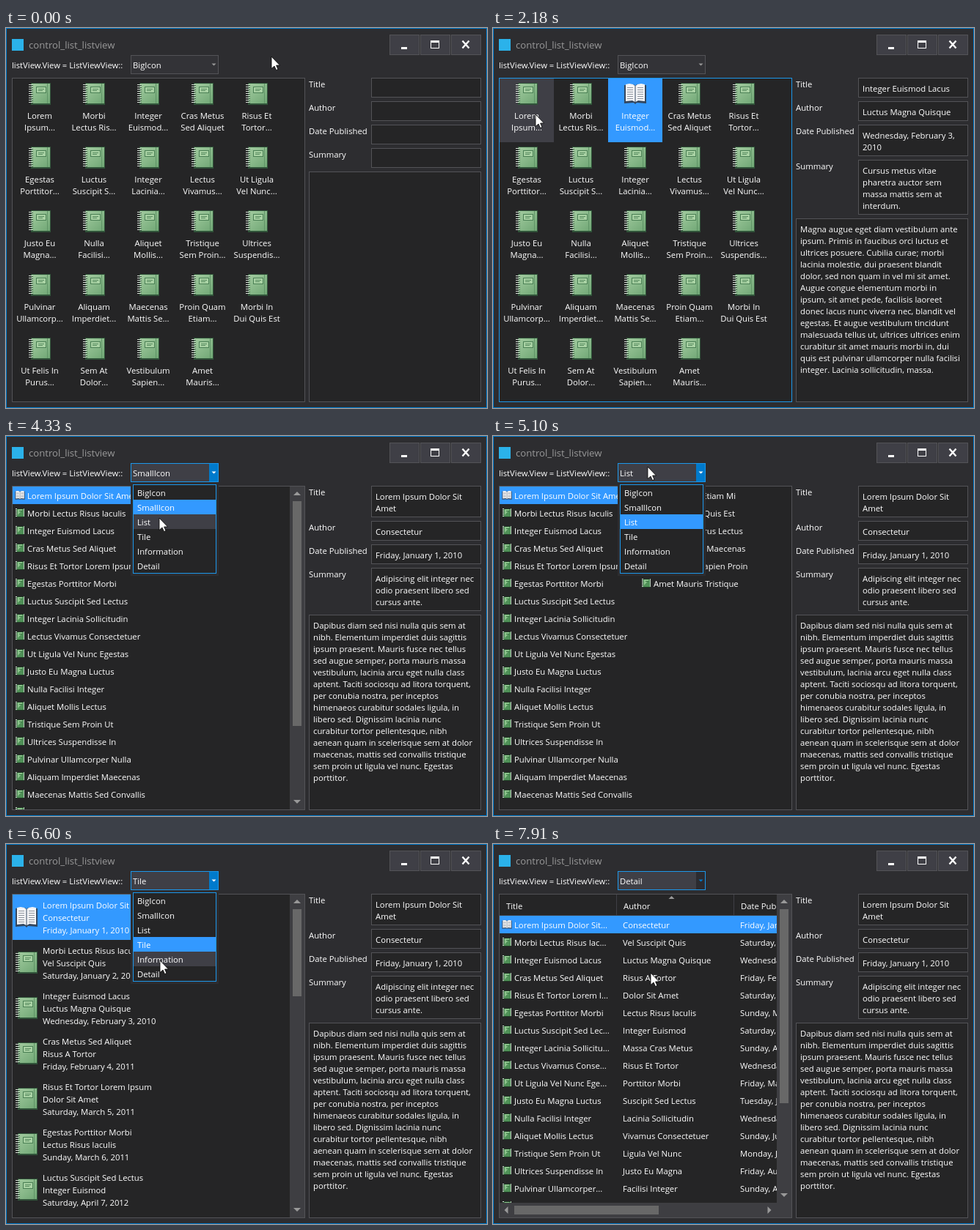
Recreate the animation shown at these times as an HTML page with a canvas. Size 656x519 px, loop 8 s.

```html
<!DOCTYPE html>
<html lang="en">
<head>
<meta charset="utf-8">
<title>control_list_listview</title>
<style>
html, body { margin: 0; width: 100%; height: 100%; overflow: hidden; background: #2d2d30; }
canvas { display: block; }
</style>
</head>
<body>
<canvas id="stage" width="656" height="519"></canvas>
<script>
const ctx = document.getElementById('stage').getContext('2d');
const LOOP = 8000;
const C = {
  bg: '#2d2d30', panel: '#252526', line: '#535357', hot: '#3f3f46', bar: '#3e3e42', thumb: '#686868',
  blue: '#007acc', focus: '#1c97ea', select: '#3399ff', text: '#ffffff', dim: '#999999'
};
const VIEWS = ['BigIcon', 'SmallIcon', 'List', 'Tile', 'Information', 'Detail'];
const BIG = 0, SMALL = 1, LIST = 2, TILE = 3, INFO = 4, DETAIL = 5;

// full title / two-line caption / author
const BOOKS = `Lorem Ipsum Dolor Sit Amet/Lorem|Ipsum.../Consectetur
Morbi Lectus Risus Iaculis/Morbi|Lectus Ris.../Vel Suscipit Quis
Integer Euismod Lacus/Integer|Euismod.../Luctus Magna Quisque
Cras Metus Sed Aliquet/Cras Metus|Sed Aliquet/Risus A Tortor
Risus Et Tortor Lorem Ipsum/Risus Et|Tortor.../Dolor Sit Amet
Egestas Porttitor Morbi/Egestas|Porttitor.../Lectus Risus Iaculis
Luctus Suscipit Sed Lectus/Luctus|Suscipit S.../Integer Euismod
Integer Lacinia Sollicitudin/Integer|Lacinia.../Massa Cras Metus
Lectus Vivamus Consectetuer/Lectus|Vivamus.../Risus Et Tortor
Ut Ligula Vel Nunc Egestas/Ut Ligula|Vel Nunc.../Porttitor Morbi
Justo Eu Magna Luctus/Justo Eu|Magna.../Suscipit Sed Lectus
Nulla Facilisi Integer/Nulla|Facilisi.../Lacinia Sollicitudin
Aliquet Mollis Lectus/Aliquet|Mollis.../Vivamus Consectetuer
Tristique Sem Proin Ut/Tristique|Sem Proin.../Ligula Vel Nunc
Ultrices Suspendisse In/Ultrices|Suspendis.../Justo Eu Magna
Pulvinar Ullamcorper Nulla/Pulvinar|Ullamcorp.../Facilisi Integer
Aliquam Imperdiet Maecenas/Aliquam|Imperdiet.../Aliquet Mollis
Maecenas Mattis Sed Convallis/Maecenas|Mattis Se.../Lectus Tristique
Proin Quam Etiam Mi/Proin Quam|Etiam.../Sem Proin
Morbi In Dui Quis Est/Morbi In|Dui Quis Est/Ultrices Suspendisse
Ut Felis In Purus Lectus/Ut Felis In|Purus.../Pulvinar Nulla
Sem At Dolor Maecenas/Sem At|Dolor.../Aliquam Imperdiet
Vestibulum Sapien Proin/Vestibulum|Sapien.../Mattis Sed
Amet Mauris Tristique/Amet|Mauris.../Convallis Proin`.split('\n').map((row, i) => {
  const [title, caption, author] = row.split('/');
  const day = new Date(2010 + Math.floor(i / 3), Math.floor(i / 2), i + 1);
  const date = day.toLocaleDateString('en-US', { weekday: 'long', month: 'long', day: 'numeric', year: 'numeric' });
  return { title, caption: caption.split('|'), author, date };
});

const DETAILS = [
  ['Lorem Ipsum Dolor Sit|Amet', 'Consectetur', 'Friday, January 1, 2010',
    'Adipiscing elit integer nec|odio praesent libero sed|cursus ante.',
    'Dapibus diam sed nisi nulla quis sem at|nibh. Elementum imperdiet duis sagittis|ipsum praesent. Mauris fusce nec tellus|sed augue semper, porta mauris massa|vestibulum, lacinia arcu eget nulla class|aptent. Taciti sociosqu ad litora torquent,|per conubia nostra, per inceptos|himenaeos curabitur sodales ligula, in|libero sed. Dignissim lacinia nunc|curabitur tortor pellentesque, nibh|aenean quam in scelerisque sem at dolor|maecenas, mattis sed convallis tristique|sem proin ut ligula vel nunc. Egestas|porttitor.'],
  ['Morbi Lectus Risus Iaculis', 'Vel Suscipit Quis', 'Saturday, January 2, 2010',
    'Luctus magna quisque|cursus metus vitae sed|aliquet risus.',
    'A tortor integer id quam morbi mi quisque|nisl felis. Venenatis tristique dignissim in|ultrices sit amet, augue proin sodales|libero eget ante. Nulla quam aenean|laoreet vestibulum nisi lectus, commodo|ac facilisis ac ultricies eu. Pede ut orci|risus accumsan porttitor, cursus quis|aliquet eget justo. Sed pretium blandit|orci ut eu diam at pede suscipit sodales.|Aenean lectus elit fermentum non|convallis id sagittis at neque. Nullam|mauris orci aliquet et iaculis et, viverra|vitae ligula. Nulla ut felis in purus|aliquam imperdiet.'],
  ['Integer Euismod Lacus', 'Luctus Magna Quisque', 'Wednesday, February 3,|2010',
    'Cursus metus vitae|pharetra auctor sem|massa mattis sem at|interdum.',
    'Magna augue eget diam vestibulum ante|ipsum. Primis in faucibus orci luctus et|ultrices posuere. Cubilia curae; morbi|lacinia molestie, dui praesent blandit|dolor, sed non quam in vel mi sit amet.|Augue congue elementum morbi in|ipsum, sit amet pede, facilisis laoreet|donec lacus nunc viverra nec, blandit vel|egestas. Et augue vestibulum tincidunt|malesuada tellus ut, ultrices ultrices enim|curabitur sit amet mauris morbi in, dui|quis est pulvinar ullamcorper nulla facilisi|integer. Lacinia sollicitudin, massa.']
].map(fields => fields.map(f => f.split('|')));
const EMPTY = Array(5).fill(['']);

// Timeline: [time, value]
const VIEW_AT = [[0, BIG], [3360, SMALL], [4520, LIST], [5530, TILE], [6830, INFO], [7910, DETAIL]];
const SELECT_AT = [[0, -1], [520, 0], [1040, 1], [1730, 2], [2320, 0]];
// Drop-down: [press, open, choose]
const DROPS = [[2880, 2960, 3360], [3900, 3980, 4520], [5000, 5080, 5530], [6100, 6240, 6830], [7350, 7430, 7910]];
// Pointer moves: [start, end, x, y]
const MOVES = [
  [30, 450, 52, 112], [750, 960, 114, 112], [1230, 1310, 184, 113], [1900, 2180, 58, 118],
  [2400, 2800, 213, 42], [2980, 3100, 213, 83], [3100, 3180, 213, 95],
  [3450, 3820, 211, 42], [4040, 4130, 210, 67], [4130, 4330, 209, 112],
  [4610, 4920, 211, 42], [5110, 5420, 210, 135], [5770, 6070, 211, 41],
  [6260, 6600, 210, 159], [6920, 7280, 213, 42], [7460, 7800, 215, 176]
];

const lastOf = (list, t) => list.filter(e => e[0] <= t).pop();
const inside = (p, [x, y, w, h]) => p.x >= x && p.x < x + w && p.y >= y && p.y < y + h;

function pointerAt(t) {
  let x = 362, y = 39;
  for (const [start, end, tx, ty] of MOVES) {
    if (t < start) break;
    const k = Math.min(1, (t - start) / (end - start)), e = k * k * (3 - 2 * k);
    x += (tx - x) * e;
    y += (ty - y) * e;
  }
  return { x: Math.round(x), y: Math.round(y) };
}

function fill(color, x, y, w, h) {
  ctx.fillStyle = color;
  ctx.fillRect(x, y, w, h);
}

function frame(color, x, y, w, h, back) {
  if (back) fill(back, x, y, w, h);
  ctx.strokeStyle = color;
  ctx.lineWidth = 1;
  ctx.strokeRect(x + 0.5, y + 0.5, w - 1, h - 1);
}

function poly(color, ...pts) {
  ctx.fillStyle = color;
  ctx.beginPath();
  pts.forEach(([x, y]) => ctx.lineTo(x, y));
  ctx.closePath();
  ctx.fill();
}

function setFont(size, weight = 500) {
  ctx.font = `${weight} ${size}px "Open Sans", "Noto Sans", sans-serif`;
}

// cy is the middle of the capitals; baselines sit on whole pixels
function label(str, x, cy, { color = C.text, size = 11.3, align = 'left', weight } = {}) {
  setFont(size, weight);
  ctx.textAlign = align;
  ctx.fillStyle = color;
  ctx.fillText(str, x, Math.round(cy + 4));
}

function shorten(str, width) {
  setFont(11.3);
  if (ctx.measureText(str).width <= width) return str;
  while (ctx.measureText(str + '...').width > width) str = str.slice(0, -1);
  return str.trimEnd() + '...';
}

function arrow(x, y, dir, color, r = 5) {
  const pts = { up: [[-r, r / 2], [r, r / 2], [0, -r / 2]], down: [[-r, -r / 2], [r, -r / 2], [0, r / 2]],
    left: [[r / 2, -r], [r / 2, r], [-r / 2, 0]], right: [[-r / 2, -r], [-r / 2, r], [r / 2, 0]] }[dir];
  poly(color, ...pts.map(([a, b]) => [x + a, y + b]));
}

function closedBook() {
  const g = ctx.createLinearGradient(4, 1, 30, 30);
  g.addColorStop(0, '#a3cca0');
  g.addColorStop(1, '#6fa674');
  fill('#31543a', 4, 1, 27, 30);
  fill(g, 5, 2, 25, 27);
  fill('#5f9466', 26, 2, 1, 27);
  frame('#4a7f54', 11, 6, 14, 9, '#a9d2a4');
  fill('#568a5e', 14, 9, 8, 1);
  fill('#568a5e', 14, 11, 6, 1);
  for (let y = 3; y < 29; y += 3) {
    fill('#d5dfd5', 1, y, 5, 1);
    fill('#3d5a43', 5, y + 1, 2, 1);
  }
}

function openBook() {
  poly('#33475f', [1, 4], [14, 3], [16, 5], [18, 3], [31, 4], [31, 29], [18, 28], [16, 30], [14, 28], [1, 29]);
  poly('#f3f4f6', [3, 3], [8, 2], [13, 3], [15.5, 5], [15.5, 27], [12, 25], [3, 26]);
  poly('#f3f4f6', [29, 3], [24, 2], [19, 3], [16.5, 5], [16.5, 27], [20, 25], [29, 26]);
  for (let y = 7; y < 23; y += 3) {
    fill('#8f959e', 5, y, 8, 1);
    fill('#8f959e', 19, y, 8, 1);
  }
}

function icon(x, y, open, scale = 1) {
  ctx.save();
  ctx.translate(x, y);
  ctx.scale(scale, scale);
  (open ? openBook : closedBook)();
  ctx.restore();
}

function smallBook(x, y) {
  fill('#1f3a24', x, y, 12, 12);
  fill('#4f9157', x + 2, y + 1, 9, 10);
  poly('#8cc48c', [x + 3, y + 1], [x + 10, y + 1], [x + 3, y + 9]);
  fill('#3a7442', x + 5, y + 3, 4, 1);
  for (let k = 0; k < 12; k += 2) fill('#dfe8df', x, y + k, 2, 1);
  fill('#b9c9ba', x + 11, y, 1, 11);
}

function cellOf(view, i) {
  switch (view) {
    case BIG: return [9 + (i % 5) * 74, 69 + Math.floor(i / 5) * 87, 74, 87];
    case SMALL: return [9, 69 + i * 24, 214, 24];
    case LIST: return [9 + Math.floor(i / 18) * 190, 69 + (i % 18) * 24, i < 18 ? 190 : 158, 24];
    case TILE: return [9, 69 + i * 62, 268, 62];
    case INFO: return [9, 69 + i * 48, 378, 48];
    default: return [9, 98 + i * 24, 378, 24];
  }
}

function drawItem(view, i, selected) {
  const [x, y, w, h] = cellOf(view, i), book = BOOKS[i];
  if (view === BIG) {
    icon(x + 21, y + 5, selected);
    book.caption.forEach((s, n) => label(s, x + 37, y + 51 + n * 16, { align: 'center' }));
  } else if (view === TILE) {
    icon(x + 3, y + 15, selected);
    [book.title, book.author, book.date].forEach((s, n) => label(s, x + 41, y + 14.5 + n * 17));
  } else if (view === INFO) {
    icon(x + 3, y + 8, selected);
    label(shorten(book.title, 145), x + 41, y + 24, { size: 12.5 });
    label('Author: ' + book.author, x + 208, y + 15);
    label(shorten(book.date, 165), x + 208, y + 32);
    if (!selected) fill(C.line, x, y + h - 1, w, 1);
  } else {
    if (selected) icon(x + 3, y + 5, true, 0.44);
    else smallBook(x + 4, y + 6);
    label(view === DETAIL ? shorten(book.title, 131) : book.title, x + 20, y + 12.5);
    if (view === DETAIL) {
      label(book.author, 177, y + 12.5);
      label(book.date, 337, y + 12.5);
    }
  }
}

function verticalBar(bottom, ratio) {
  fill(C.bar, 387, 69, 20, bottom - 69);
  arrow(397, 78.5, 'up', C.dim);
  arrow(397, bottom - 10.5, 'down', C.dim);
  fill(C.thumb, 391, 89, 12, Math.round((bottom - 109) * ratio));
}

function drawHeader() {
  fill(C.panel, 9, 69, 378, 29);
  fill(C.hot, 9, 97, 378, 1);
  ['Title', 'Author', 'Date Published'].forEach((s, n) => {
    label(s, 18 + n * 160, 85);
    if (n < 2) fill(C.hot, 168 + n * 160, 69, 1, 29);
  });
  arrow(243.5, 73, 'up', C.dim, 4);
}

function drawList(view, selected, hovered, focused) {
  frame(focused ? C.focus : C.line, 8, 68, 400, 443, C.panel);
  const scrolls = view !== BIG && view !== LIST;
  const bottom = view === DETAIL ? 490 : 510;
  ctx.save();
  ctx.beginPath();
  ctx.rect(9, 69, scrolls ? 378 : 398, bottom - 69);
  ctx.clip();
  BOOKS.forEach((_, i) => {
    const cell = cellOf(view, i);
    if (i === selected) fill(C.select, ...cell);
    else if (i === hovered) fill(C.hot, ...cell);
    drawItem(view, i, i === selected);
  });
  if (view === DETAIL) drawHeader();
  ctx.restore();
  if (!scrolls) return;
  const total = view === DETAIL ? 605 : BOOKS.length * cellOf(view, 0)[3];
  verticalBar(bottom, (bottom - 69) / total);
  if (view === DETAIL) {
    fill(C.bar, 9, 490, 398, 20);
    arrow(18, 500, 'left', C.dim);
    arrow(377, 500, 'right', C.dim);
    fill(C.thumb, 29, 494, 197, 12);
  }
}

function drawDetails(selected) {
  const fields = DETAILS[selected] || EMPTY;
  let y = 68;
  ['Title', 'Author', 'Date Published', 'Summary'].forEach((name, n) => {
    const h = 11 + 16 * fields[n].length;
    label(name, 413, y + 9);
    frame(C.line, 498, y, 150, h, C.panel);
    fields[n].forEach((s, k) => label(s, 504, y + 15 + k * 16));
    y += h + 5;
  });
  frame(C.line, 413, y, 235, 511 - y, C.panel);
  fields[4].forEach((s, k) => label(s, 419, y + 14.5 + k * 16));
}

function drawWindow() {
  frame(C.blue, 0, 0, 656, 519, C.bg);
  fill('#2bb2ea', 8, 15, 16, 16);
  label('control_list_listview', 31, 23.5, { color: C.dim, size: 13.15, weight: 400 });
  for (const x of [523, 565, 607]) frame(C.line, x, 9, 41, 28, C.hot);
  fill('#ffffff', 539, 26, 8, 3);
  frame('#ffffff', 579, 17, 12, 11);
  fill('#ffffff', 579, 17, 12, 3);
  ctx.strokeStyle = '#ffffff';
  ctx.lineWidth = 2.4;
  ctx.beginPath();
  ctx.moveTo(622.5, 17.5); ctx.lineTo(631.5, 27.5);
  ctx.moveTo(631.5, 17.5); ctx.lineTo(622.5, 27.5);
  ctx.stroke();
  label('listView.View = ListViewView::', 8, 51);
}

function drawCombo(view, pressed, hot, focused) {
  const lit = pressed || hot;
  frame(lit || focused ? C.focus : C.line, 170, 37, 120, 26, lit ? C.hot : '#333337');
  if (pressed) fill(C.blue, 277, 38, 12, 24);
  else if (hot) fill('#2b2b30', 277, 38, 12, 24);
  arrow(283.5, 50, 'down', pressed ? '#ffffff' : hot ? C.blue : C.dim, 3);
  label(VIEWS[view], 173, 51);
}

function drawPopup(view, pointer) {
  fill(C.bg, 170, 63, 120, 128);
  frame(C.focus, 173, 66, 114, 122, C.panel);
  VIEWS.forEach((name, i) => {
    const row = [174, 67 + i * 20, 112, 20];
    if (i === view) fill(C.select, ...row);
    else if (inside(pointer, row)) fill(C.hot, ...row);
    label(name, 179, 78 + i * 20);
  });
}

function drawPointer({ x, y }) {
  ctx.save();
  ctx.translate(x, y);
  ctx.beginPath();
  [[0, 0], [0, 16.5], [4, 13], [6.5, 18.5], [9, 17.5], [6.6, 12], [11.5, 12]].forEach(p => ctx.lineTo(...p));
  ctx.closePath();
  ctx.fillStyle = '#ffffff';
  ctx.fill();
  ctx.strokeStyle = '#000000';
  ctx.lineWidth = 0.8;
  ctx.stroke();
  ctx.restore();
}

function render(t) {
  const pointer = pointerAt(t);
  const [chosenAt, view] = lastOf(VIEW_AT, t);
  const selected = lastOf(SELECT_AT, t)[1];
  const drop = DROPS.find(([press, , choose]) => t >= press && t < choose);
  const open = drop && t >= drop[1];
  const settling = chosenAt > 0 && t < chosenAt + 130;
  const comboFocus = t >= DROPS[0][0];

  let hovered = -1;
  if (!open && !settling && pointer.y < 510 && pointer.x < 387)
    hovered = BOOKS.findIndex((_, i) => inside(pointer, cellOf(view, i)));

  drawWindow();
  drawList(view, selected, hovered, selected >= 0 && !comboFocus);
  drawDetails(selected);
  drawCombo(view, !!drop, settling || inside(pointer, [170, 37, 120, 26]), comboFocus);
  if (open) drawPopup(view, pointer);
  drawPointer(pointer);
}

const began = performance.now();
function tick() {
  render((performance.now() - began) % LOOP);
  requestAnimationFrame(tick);
}
tick();
</script>
</body>
</html>
```
